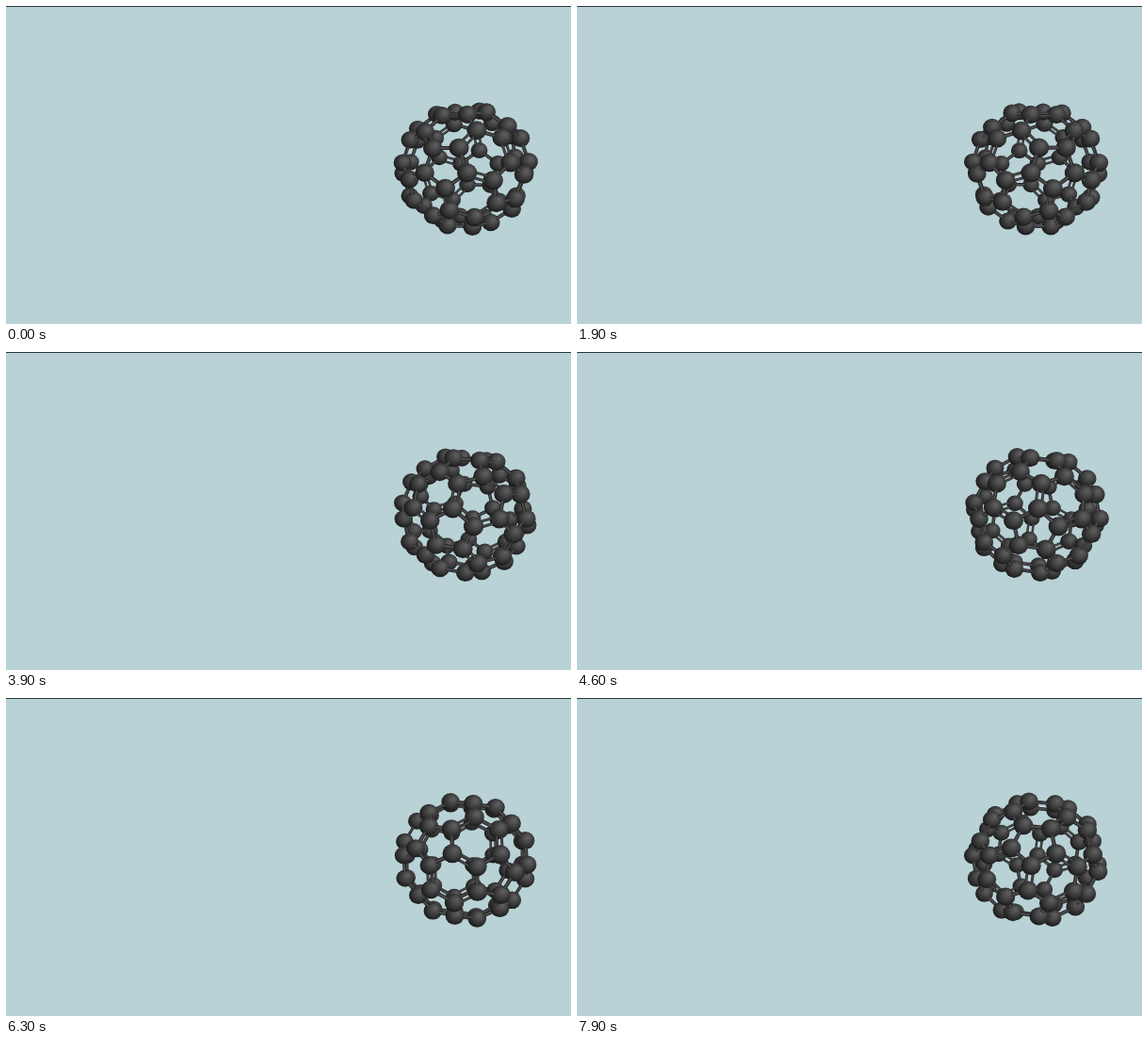
An HTML page with a canvas for the animation above (8 s loop, 600 by 338 pixels).

```html
<!DOCTYPE html>
<html lang="en">
<head>
<meta charset="utf-8">
<title>Spinning carbon cage</title>
<style>
  html, body { margin: 0; width: 100%; height: 100%; overflow: hidden; background: #b8d2d6; }
  canvas { display: block; width: 600px; height: 338px; }
</style>
</head>
<body>
<canvas id="stage" width="600" height="338"></canvas>
<script>
const ctx = document.getElementById('stage').getContext('2d');
const LOOP = 8000, STEP = 100;
const RAD = Math.PI / 180;

// Camera and placement; lengths are in units of the distance to the cage.
const FOCAL = 651, WIDEN = 1.02, CX = 300, CY = 169;
const SIZE = 0.0975, OFF_X = 0.28, OFF_Y = 0.0046;
const ATOM = 0.01405, STRETCH = 1.05;
const TILT = 2 * RAD, START = -31.9, SPEED = 17;

const add = (a, b, k = 1) => a.map((v, i) => v + b[i] * k);
const dot = (a, b) => a[0] * b[0] + a[1] * b[1] + a[2] * b[2];
const unit = a => a.map(v => v / Math.hypot(...a));
const cross = (a, b) => [
  a[1] * b[2] - a[2] * b[1],
  a[2] * b[0] - a[0] * b[2],
  a[0] * b[1] - a[1] * b[0]
];

// Pentagon directions: the corners of an icosahedron, one facing the viewer.
function pentagonAxes() {
  const axes = [[0, 0, 1]];
  const z = 1 / Math.sqrt(5), r = 2 / Math.sqrt(5);
  for (let i = 0; i < 5; i++) {
    const a = (36 + 72 * i) * RAD;
    axes.push([r * Math.sin(a), r * Math.cos(a), z]);
  }
  return axes.concat(axes.map(p => p.map(v => -v)));
}

// Cutting the corners of the icosahedron gives sixty atoms.
function buildCage() {
  const axes = pentagonAxes();
  const near = (a, b) => Math.abs(dot(axes[a], axes[b]) - 1 / Math.sqrt(5)) < 0.01;
  const atoms = [], bonds = [];
  axes.forEach((p, a) => axes.forEach((q, b) => {
    if (near(a, b)) atoms.push({ a, b, pos: unit(add(p, q, 0.5)) });
  }));
  atoms.forEach((u, i) => atoms.slice(i + 1).forEach(v => {
    const double = u.a === v.b && u.b === v.a;
    const single = u.a === v.a && near(u.b, v.b);
    if (double || single) addBond(bonds, u.pos, v.pos, double);
  }));
  return { atoms: atoms.map(u => u.pos), bonds };
}

function addBond(bonds, p, q, double) {
  const dir = add(q, p, -1);
  const from = add(p, dir, 0.28), to = add(q, dir, -0.28);
  const side = unit(cross(dir, add(p, q)));
  const shifts = double ? [-0.043, 0.043] : [0];
  for (const s of shifts) {
    bonds.push({ from: add(from, side, s), to: add(to, side, s), width: double ? 0.042 : 0.06 });
  }
}

function spin([x, y, z], angle) {
  const ct = Math.cos(TILT), st = Math.sin(TILT);
  const c = Math.cos(angle), s = Math.sin(angle);
  const y1 = y * ct + z * st, z1 = z * ct - y * st;
  return [x * c + z1 * s, y1, z1 * c - x * s];
}

function project(p, angle) {
  const [x, y, z] = spin(p, angle);
  const X = OFF_X + SIZE * x, Y = OFF_Y - SIZE * y, Z = 1 - SIZE * z;
  const scale = FOCAL / Z;
  return { x: CX + scale * WIDEN * X, y: CY + scale * Y, scale, dist: Math.hypot(X, Y, Z) };
}

// Light falls from the upper right.
const shade = ctx.createRadialGradient(0.32, -0.38, 0, 0.1, -0.1, 1.2);
[[0, '#616062'], [0.35, '#4c4b4c'], [0.7, '#313031'], [1, '#161516']]
  .forEach(([at, color]) => shade.addColorStop(at, color));

function drawAtom(p) {
  const r = ATOM * p.scale;
  ctx.save();
  ctx.translate(p.x, p.y);
  ctx.scale(r * STRETCH, r);
  ctx.fillStyle = shade;
  ctx.beginPath();
  ctx.arc(0, 0, 1, 0, 2 * Math.PI);
  ctx.fill();
  ctx.restore();
}

function drawBond(p, q, width) {
  const w = width * SIZE * (p.scale + q.scale) / 2;
  for (const [color, k] of [['#272627', 1], ['#4d4c4d', 0.5]]) {
    ctx.strokeStyle = color;
    ctx.lineWidth = w * k;
    ctx.beginPath();
    ctx.moveTo(p.x, p.y);
    ctx.lineTo(q.x, q.y);
    ctx.stroke();
  }
}

const cage = buildCage();

function draw(ms) {
  const angle = (START + SPEED * ms / 1000) * RAD;
  ctx.fillStyle = '#b8d2d6';
  ctx.fillRect(0, 0, 600, 338);
  ctx.fillStyle = '#2c3840';
  ctx.fillRect(0, 0, 600, 1);

  const items = cage.atoms.map(pos => {
    const p = project(pos, angle);
    return { dist: p.dist, paint: () => drawAtom(p) };
  });
  for (const bond of cage.bonds) {
    const p = project(bond.from, angle), q = project(bond.to, angle);
    items.push({ dist: (p.dist + q.dist) / 2, paint: () => drawBond(p, q, bond.width) });
  }
  items.sort((a, b) => b.dist - a.dist).forEach(item => item.paint());
}

const begin = performance.now();
function tick() {
  const t = (performance.now() - begin) % LOOP;
  draw(Math.floor(t / STEP) * STEP);
  requestAnimationFrame(tick);
}
tick();
</script>
</body>
</html>
```
